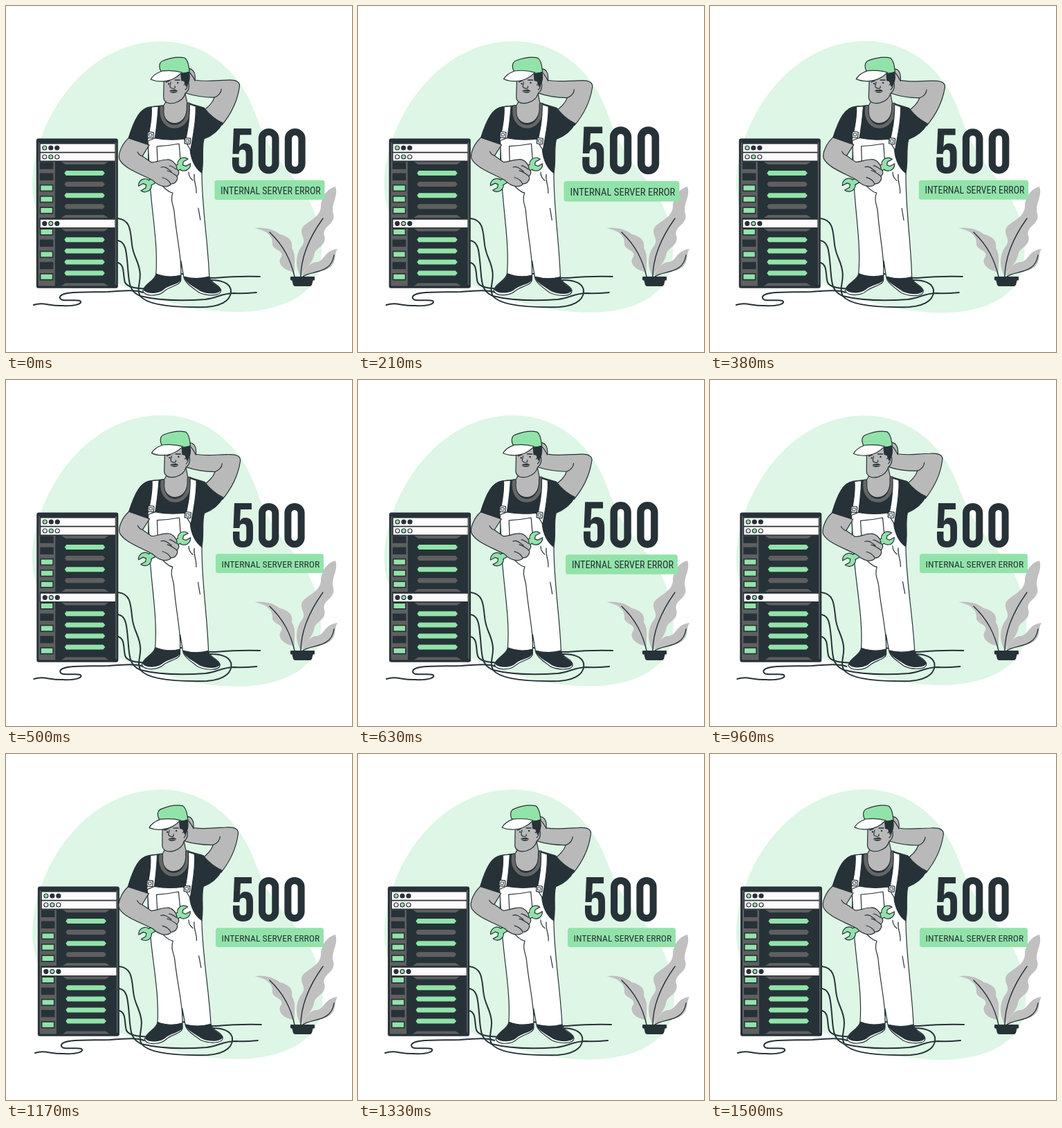
An HTML page with a canvas for the animation above (1540 ms loop, 500 by 500 pixels).

```html
<!DOCTYPE html>
<html lang="en">
<head>
<meta charset="utf-8">
<title>500 Internal server error</title>
<style>
html, body { margin: 0; width: 100%; height: 100%; overflow: hidden; background: #fff; }
canvas { display: block; width: 500px; height: 500px; }
</style>
</head>
<body>
<canvas id="stage" role="img" aria-label="500 Internal server error"></canvas>
<script>
const canvas = document.getElementById('stage');
const ctx = canvas.getContext('2d');
const ratio = window.devicePixelRatio || 1;
canvas.width = canvas.height = 500 * ratio;

const DARK = '#263238', GREEN = '#92e3a9', PALE = '#def6e5', WHITE = '#fff';
const SKIN = '#b9b9b9', LEAF = '#c0c0c0', STEEL = '#605f60';
const LOOP = 1540, CYCLE = 1500, LEAD = 30;

const paths = new Map();
function path(d) {
  if (!paths.has(d)) paths.set(d, new Path2D(d));
  return paths.get(d);
}
function fill(d, color) {
  ctx.fillStyle = color;
  ctx.fill(path(d));
}
function line(d, width = 1.2, color = DARK) {
  ctx.strokeStyle = color;
  ctx.lineWidth = width;
  ctx.stroke(path(d));
}
function shape(d, color, width) {
  fill(d, color);
  line(d, width);
}
function box(x, y, w, h, color, radius = 0) {
  ctx.beginPath();
  ctx.roundRect(x, y, w, h, radius);
  ctx.fillStyle = color;
  ctx.fill();
}
function disc(x, y, r, color, outline) {
  ctx.beginPath();
  ctx.arc(x, y, r, 0, Math.PI * 2);
  ctx.fillStyle = color;
  ctx.fill();
  if (outline) {
    ctx.strokeStyle = DARK;
    ctx.lineWidth = outline;
    ctx.stroke();
  }
}

// Linear keyframes: [position 0..1, value] pairs.
function keyed(frames, p) {
  const i = Math.max(1, frames.findIndex(f => f[0] >= p));
  const [p0, v0] = frames[i - 1], [p1, v1] = frames[i];
  return v0 + (v1 - v0) * (p - p0) / (p1 - p0);
}
const BEAT = [[0, 1], [.1, 1.1], [.3, 1], [.4, 1], [.5, 1.1], [.6, 1], [1, 1]];
const SWAY = [[0, 0], [.25, 1], [.75, -1], [1, 0]];
const SHAKE = [0, -1, 2, -4, 4, -4, 4, -4, 2, -1, 0].map((v, i) => [i / 10, v]);

function drawBlob() {
  fill('M223 51C290 51 340 95 362 160C379 209 400 228 424 259C450 292 465 345 451 385C437 425 385 443 330 442C280 441 225 428 175 407C100 375 38 330 38 258C40 163 115 52 223 51Z', PALE);
}

function drawCables() {
  line('M162 307C180 309 180 325 182 343C184 364 193 368 194 388C194 402 189 409 194 419C206 434 250 436 290 435C318 433 327 421 325 409C322 400 310 396 295 396', 2);
  line('M162 339C174 341 174 356 176 375C178 398 177 412 194 419C222 426 260 426 288 424C305 422 312 415 330 415C345 416 352 415 362 414', 2);
  line('M162 371C172 374 169 388 172 399C177 411 205 407 222 411', 2);
  line('M240 386C270 387 278 394 302 393C325 391 340 390 367 391', 2);
  line('M40 432C55 427 62 434 82 433C101 434 112 430 107 426C100 423 78 429 78 421C79 412 112 414 148 413C172 411 188 410 198 414', 2);
}

function drawLights(y, colors) {
  colors.forEach((color, i) => disc(56 + i * 9, y, 3, color, 1.2));
}
function drawSlots(y, colors) {
  colors.forEach((color, i) => {
    const top = y + i * 16.2;
    box(49, top - 1, 19.5, 10.4, DARK);
    if (color === GREEN) box(50.6, top + .7, 16.4, 7, GREEN);
  });
}
function drawBlade(y, color) {
  fill(`M87 ${y}H140L143 ${y + 3.5}L140 ${y + 7}H87L84.5 ${y + 3.5}Z`, color);
}
function drawServer() {
  box(44, 191.5, 118, 216.3, DARK, 3);
  box(47, 197, 1.6, 206, STEEL);
  box(158, 197, 1.6, 206, STEEL);
  for (const [y, h] of [[199.5, 11.3], [212.6, 11], [308.8, 11.2]]) box(50, y, 107.5, h, '#fffafc');
  drawLights(205, [GREEN, DARK, DARK]);
  drawLights(218, [WHITE, GREEN, WHITE]);
  drawLights(314.3, [DARK, GREEN, DARK]);
  for (const [y, h] of [[225, 81], [321.5, 83]]) {
    box(47, y, 24, h, STEEL);
    fill(`M80 ${y}H148L142 ${y + 4}H86Z`, STEEL);
    fill(`M80 ${y + h}H148L142 ${y + h - 4}H86Z`, STEEL);
  }
  drawSlots(226.4, [DARK, DARK, GREEN, GREEN, GREEN]);
  drawSlots(322.3, [GREEN, DARK, GREEN, DARK, GREEN]);
  [GREEN, STEEL, GREEN, STEEL].forEach((color, i) => drawBlade(238 + i * 16.1, color));
  for (let i = 0; i < 4; i++) drawBlade(334.3 + i * 16.1, GREEN);
}

function drawRaisedArm() {
  shape('M261 91C269 89 274 95 273 107C290 110 302 107 319 107C333 106 339 110 337 118C334 138 325 156 312 172L282 153C290 148 298 141 301 132C286 132 272 130 260 126Z', SKIN);
  line('M301 132C307 130 311 125 311 120M265 96C269 100 271 104 273 108');
}

function drawShirt() {
  shape('M208 146C194 148 186 162 177 191L206 201L205 246H282C287 225 282 208 286 192C299 187 307 180 313 169C302 164 293 156 286 147L262 140Z', DARK);
  shape('M231 138L226 147C225 178 264 178 262 142L258 122Z', SKIN);
  line('M225 147C221 184 267 184 264 143', 7);
  line('M225 147C221 184 267 184 264 143', 5, '#666');
}

function drawHead() {
  shape('M228 106L227.5 132C228 140 236 142 244 140C251 138 257 134 259 126C266 121 266 108 259 108L252 96Z', SKIN);
  fill('M252 97L264 93C267 102 266 111 260 117L257 109L253 108Z', DARK);
  line('M257 114C262 108 264 116 259 121M238 110C237 114 235 118 240 119C243 120 245 118 244 116');
  line('M231 110L236 108M244 107L251 107', 1.4);
  disc(235, 112.5, 1.2, DARK);
  disc(248, 111, 1.2, DARK);
  fill('M236 123C239 120 241 122 242 121C244 120 246 121 248 123C247 126 238 127 236 123Z', DARK);
  line('M237 123.5L247 123.5', .7, SKIN);
  shape('M224 95C220 88 221 81 227 79C237 75 249 73 258 75C263 79 264 87 265 95C253 100 237 95 224 95Z', GREEN);
  shape('M225 94C217 97 211 102 209 106C220 111 234 109 242 105C248 102 251 99 254 96C244 93 234 93 225 94Z', WHITE);
}

function drawOveralls() {
  shape('M210 146L220 145C219 162 217 181 214 197L204 195C208 178 211 162 210 146Z', WHITE);
  shape('M265 142L274 145C275 166 270 188 267 207L257 204C262 184 266 164 265 142Z', WHITE);
  shape('M205 195L215 191Q236 195 257 192L266 207C267 222 274 235 283 241C283 290 292 341 294 391Q276 396 257 391L253 368L253 389Q235 394 217 387C220 345 211 301 208 255Z', WHITE);
  line('M219 226L218 203Q235 202 250 199L252 222M226 260C231 265 237 270 241 270C237 281 242 288 243 296C246 329 252 354 253 378M272 243C271 255 276 260 275 270M278 292L281 309M264 240C264 248 268 250 270 252');
  for (const [x, y] of [[208.8, 186.5], [262.3, 195]]) {
    ctx.save();
    ctx.translate(x, y);
    ctx.rotate(.1);
    box(-4.8, -4.8, 9.6, 9.6, DARK, 1.5);
    box(-3.6, -3.6, 7.2, 7.2, WHITE, 1);
    line('M-2 -1.8H2V1.8H-2Z', .9);
    ctx.restore();
  }
}

function drawShoes() {
  shape('M217 387C216 397 199 402 198 412C202 421 222 419 229 412C237 405 252 404 253 396V389Q235 394 217 387Z', WHITE);
  fill('M217 387C216 397 199 402 199 411C205 417 221 416 228 410C236 403 252 402 253 395V389Q235 394 217 387Z', DARK);
  shape('M257 391C258 400 270 407 279 414C290 419 311 420 311 411C310 402 295 401 294 391Q276 396 257 391Z', WHITE);
  fill('M257 391C258 399 271 405 281 412C291 417 309 417 311 410C307 402 295 401 294 391Q276 396 257 391Z', DARK);
}

function drawWrench() {
  ctx.save();
  ctx.translate(229, 244);
  ctx.rotate(-.5);
  ctx.beginPath();
  for (const side of [1, -1]) {
    const turn = side > 0 ? 0 : Math.PI;
    ctx.lineTo(24 * side, -4 * side);
    ctx.arc(32 * side, 0, 9.5, Math.PI + turn + .45, turn - .4);
    ctx.lineTo(33 * side, -3.6 * side);
    ctx.lineTo(30 * side, 0);
    ctx.lineTo(33 * side, 3.6 * side);
    ctx.arc(32 * side, 0, 9.5, turn + .4, Math.PI + turn - .45);
    ctx.lineTo(24 * side, 4 * side);
  }
  ctx.closePath();
  ctx.fillStyle = GREEN;
  ctx.strokeStyle = DARK;
  ctx.lineWidth = 1.2;
  ctx.fill();
  ctx.stroke();
  ctx.restore();
}

function drawLowerArm() {
  shape('M177 191C168 199 161 214 164 222C171 235 193 242 212 252C221 261 233 264 239 257C246 257 249 249 247 246C252 241 249 237 247 236C247 228 239 221 232 222C225 222 217 226 210 226L197 217L207 201Z', SKIN);
  line('M197 217C193 216 191 213 190 211M224 233C231 231 234 236 239 239M238 257C235 251 230 249 226 248M247 246C242 242 237 239 233 238M246 236C242 233 239 231 236 231');
}

function drawMan() {
  drawRaisedArm();
  drawShirt();
  drawHead();
  drawShoes();
  drawOveralls();
  drawWrench();
  drawLowerArm();
}

function drawPlant() {
  fill('M426 391C416 373 420 356 428 346C436 336 420 328 431 317C444 307 456 302 455 287C458 270 468 263 476 261C481 275 469 286 473 300C477 316 456 318 460 332C464 348 446 348 445 361C441 375 432 378 426 391Z', LEAF);
  fill('M414 384C400 381 391 371 398 362C402 352 383 353 385 342C385 329 373 324 359 321C374 319 387 323 396 330C410 333 415 341 413 350C420 360 416 372 417 388Z', LEAF);
  fill('M428 389C433 378 441 370 449 370C460 369 460 353 479 351C474 358 478 368 470 376C461 385 440 384 428 390Z', LEAF);
  line('M426 392C426 362 440 332 458 307M417 391C411 366 401 346 381 327M429 391C441 382 470 388 474 360', 1.4);
  box(411, 391, 35, 5.5, DARK, 1);
  fill('M413 395H444L442 403Q441 405 439 405H418Q416 405 415 403Z', DARK);
}

const LABEL = 'INTERNAL SERVER ERROR';

// Picks the narrowest installed face, then the largest size that fits the sign.
function chooseLabelFont() {
  const options = ['"Noto Sans"', '"Open Sans"', 'Roboto', '"Roboto Condensed"', 'Lato'].map(family => {
    const font = size => `ultra-condensed ${size}px ${family}, sans-serif`;
    ctx.font = font(100);
    return { font, em: ctx.measureText(LABEL).width / 100 };
  });
  const best = options.reduce((a, b) => b.em < a.em ? b : a);
  return best.font(Math.min(16.8, 142 / best.em));
}
const labelFont = chooseLabelFont();

function drawNotice() {
  fill('M330 178H355V187H339L338 204C340 200 343 199 346 199C354 199 357 204 357 213V227C357 237 352 242 342.5 242C333 242 328 237 328 227V219H337.5V228C337.5 231 339 233 342.5 233C346 233 347.3 231 347.3 228V214C347.3 210 346 208 342.5 208C339 208 337.7 210 337.5 214H328.5Z', DARK);
  for (const x of [379.7, 417]) {
    ctx.beginPath();
    ctx.roundRect(x - 9.6, 182.9, 19.2, 54.3, 9.4);
    ctx.strokeStyle = DARK;
    ctx.lineWidth = 10;
    ctx.stroke();
  }
  box(303, 251.3, 156, 27.7, GREEN, 3.5);
  ctx.font = labelFont;
  ctx.textAlign = 'center';
  ctx.fillStyle = DARK;
  const { actualBoundingBoxAscent: ascent } = ctx.measureText(LABEL);
  ctx.fillText(LABEL, 382.4, 266.2 + ascent / 2);
}

function around(x, y, scale, degrees, draw) {
  ctx.save();
  ctx.translate(x, y);
  ctx.rotate(degrees * Math.PI / 180);
  ctx.scale(scale, scale);
  ctx.translate(-x, -y);
  draw();
  ctx.restore();
}

function render(time) {
  // The motion advances in 24 steps per second.
  const step = Math.floor((time % LOOP + 5) * .024);
  const p = Math.min(1, (step / .024 + LEAD) / CYCLE);
  const tilt = keyed(SWAY, p);

  ctx.setTransform(ratio, 0, 0, ratio, 0, 0);
  ctx.fillStyle = WHITE;
  ctx.fillRect(0, 0, 500, 500);
  ctx.lineJoin = ctx.lineCap = 'round';

  around(249, 246, 1, tilt, drawBlob);
  ctx.save();
  ctx.translate(keyed(SHAKE, p), 0);
  drawCables();
  drawServer();
  ctx.restore();
  around(249, 246, 1, tilt, drawMan);
  drawPlant();
  around(381, 228.5, keyed(BEAT, p), 0, drawNotice);
}

const start = performance.now();
function tick() {
  render(performance.now() - start);
  requestAnimationFrame(tick);
}
tick();
</script>
</body>
</html>
```
